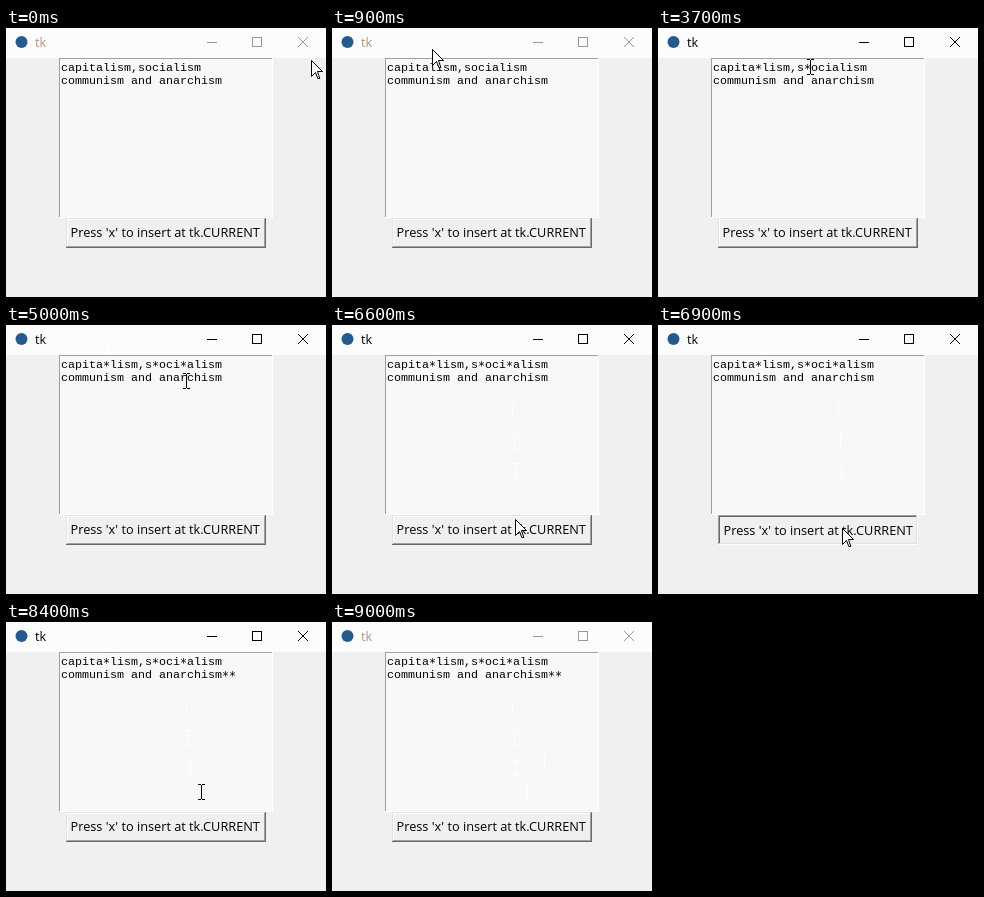
An HTML page for the animation above (9.1 s loop, 320 by 269 pixels).

```html
<!DOCTYPE html>
<html lang="en">
<head>
<meta charset="utf-8">
<title>tk</title>
<style>
  html, body { margin: 0; width: 100%; height: 100%; overflow: hidden; background: #f0f0f0; }
  svg { display: block; width: 320px; height: 269px; }
  .ui { font: 12.75px "Open Sans", "Noto Sans", sans-serif; }
  .mono { font: 11.67px "Liberation Mono", "Courier New", monospace; white-space: pre; }
  .star { font-family: "DejaVu Sans Mono", monospace; }
  .crisp { shape-rendering: crispEdges; }
  #controls { color: #999; fill: none; stroke: currentColor; }
  #title { fill: #b3927c; }
  #ghosts { color: #fff; }
</style>
</head>
<body>
<svg viewBox="0 0 320 269">
  <defs>
    <path id="arrowShape" d="M.5.5V16.5L4.5 12.5L6.8 18.5H8.8L6.5 11.5H11.5Z"/>
    <path id="beamShape" class="crisp" fill="none" stroke="currentColor"
      d="M-3-7.5H0M1-7.5H4M.5-7V7M-3 7.5H0M1 7.5H4"/>
    <clipPath id="bar"><rect width="320" height="30"/></clipPath>
  </defs>

  <rect width="320" height="269" fill="#f0f0f0"/>
  <rect width="320" height="30" fill="#fcfcfc"/>
  <circle cx="15.5" cy="14" r="6" fill="#245a8c"/>
  <text id="title" class="ui" x="29" y="19">tk</text>
  <g id="controls">
    <path class="crisp" d="M201 14.5H211M246.5 9.5H255.5V18.5H246.5Z"/>
    <path d="M292 9L302 19M302 9L292 19"/>
  </g>

  <rect x="53" y="30" width="214" height="160" fill="#f8f8f8"/>
  <g id="ghosts"></g>
  <path class="crisp" fill="none" stroke="#a0a0a0" d="M53.5 190V30.5H267"/>
  <path class="crisp" fill="none" stroke="#fff" d="M53 189.5H266.5V30"/>
  <g id="lines" class="mono"></g>

  <g id="raised" class="crisp" fill="none">
    <path stroke="#e3e3e3" d="M60.5 219V190.5H259"/>
    <path stroke="#fff" d="M61.5 218V191.5H258"/>
    <path stroke="#a0a0a0" d="M61 218.5H258.5V191"/>
    <path stroke="#696969" d="M60 219.5H259.5V190"/>
  </g>
  <g id="sunken" class="crisp" fill="none">
    <path stroke="#a0a0a0" d="M60.5 219V190.5H259"/>
    <path stroke="#696969" d="M61.5 218V191.5H258"/>
    <path stroke="#e3e3e3" d="M61 218.5H258.5V191"/>
    <path stroke="#fff" d="M60 219.5H259.5V190"/>
  </g>
  <text id="label" class="ui" x="64.5" y="209">Press 'x' to insert at tk.CURRENT</text>

  <g id="cursor">
    <use id="arrow" href="#arrowShape" fill="#fff" stroke="#000"/>
    <use id="beam" href="#beamShape" color="#000"/>
  </g>
</svg>
<script>
const LOOP = 9100, STEP = 100;
const $ = id => document.getElementById(id);

// Plays [time, style] pairs as hard changes.
function play(el, keys) {
  const frames = keys.map(([t, style]) => ({ offset: t / LOOP, easing: 'step-end', ...style }));
  frames.push({ ...frames[frames.length - 1], offset: 1 });
  el.animate(frames, { duration: LOOP, iterations: Infinity });
}

function show(el, from, to = LOOP) {
  const keys = [[0, { opacity: from ? 0 : 1 }]];
  if (from) keys.push([from, { opacity: 1 }]);
  if (to < LOOP) keys.push([to, { opacity: 0 }]);
  play(el, keys);
}

function add(parent, tag, attrs) {
  const el = document.createElementNS('http://www.w3.org/2000/svg', tag);
  for (const name in attrs) el.setAttribute(name, attrs[name]);
  return parent.appendChild(el);
}

// One text line; each [time, column] inserts a star.
function typeLine(text, y, inserts) {
  let from = 0;
  for (const [time, column] of [...inserts, [LOOP, 0]]) {
    const el = add($('lines'), 'text', { x: 55, y });
    el.innerHTML = text.replace(/(\*+)(.?)/g,
      '<tspan class="star" dy="2">$1</tspan><tspan dy="-2">$2</tspan>');
    show(el, from, time);
    text = text.slice(0, column) + '*' + text.slice(column);
    from = time;
  }
}

typeLine('capitalism,socialism', 43, [[2400, 6], [3700, 13], [4500, 17]]);
typeLine('communism and anarchism', 56, [[7000, 23], [7500, 24]]);

// Window focus
play($('title'), [[0, { fill: '#b3927c' }], [1000, { fill: '#000' }], [9000, { fill: '#b3927c' }]]);
play($('controls'), [[0, { color: '#999' }], [1000, { color: '#000' }], [9000, { color: '#999' }]]);

// Button clicks
const clicks = [[6900, 7000], [7400, 7500]];
const button = (up, down) => [[0, up], ...clicks.flatMap(([a, b]) => [[a, down], [b, up]])];
play($('raised'), button({ opacity: 1 }, { opacity: 0 }));
play($('sunken'), button({ opacity: 0 }, { opacity: 1 }));
play($('label'), button({ transform: 'translate(0px, 0px)' }, { transform: 'translate(1px, 1px)' }));

// Pointer legs: shape, start time, steps, end x, end y
const legs = [
  ['arrow', 0, 1, 305, 32], ['arrow', 100, 1, 284, 31],
  ['beam', 200, 1, 240, 36], ['beam', 300, 3, 110, 43], ['beam', 700, 1, 104, 38],
  ['arrow', 800, 2, 100, 21],
  ['beam', 1200, 2, 99, 42], ['beam', 2700, 7, 152, 39], ['beam', 3900, 5, 179, 39],
  ['beam', 4600, 5, 180, 56], ['beam', 6200, 4, 184, 176],
  ['arrow', 6600, 1, 183, 194], ['arrow', 6700, 2, 184, 203],
  ['beam', 8400, 1, 195, 170], ['beam', 8500, 1, 212, 140],
  ['arrow', 8600, 1, 270, 82], ['arrow', 8700, 1, 294, 52]
];
const path = [], shapes = { arrow: [], beam: [] };
let px = 305, py = 32;
for (const [shape, start, steps, x, y] of legs) {
  for (let i = 1; i <= steps; i++) {
    const at = (a, b) => Math.round(a + (b - a) * i / steps);
    path.push([start + (i - 1) * STEP, { transform: `translate(${at(px, x)}px, ${at(py, y)}px)` }]);
  }
  for (const name in shapes) shapes[name].push([start, { opacity: name === shape ? 1 : 0 }]);
  [px, py] = [x, y];
}
play($('cursor'), path);
for (const name in shapes) play($(name), [...shapes[name], [8800, { opacity: 0 }]]);

// Pale traces the pointer leaves behind
const ghosts = $('ghosts');
const titleGhost = add(ghosts, 'g', { 'clip-path': 'url(#bar)' });
add(titleGhost, 'use', { href: '#arrowShape', x: 100, y: 21, fill: '#fff' });
show(titleGhost, 1200);
show(add(ghosts, 'path', { d: 'M178 62.5H183', stroke: '#fff' }), 6200);
for (const [time, x, y] of [[6300, 180, 86], [6400, 182, 116], [6500, 183, 146], [8500, 195, 170], [8600, 212, 140]])
  show(add(ghosts, 'use', { href: '#beamShape', x, y }), time);
</script>
</body>
</html>
```
